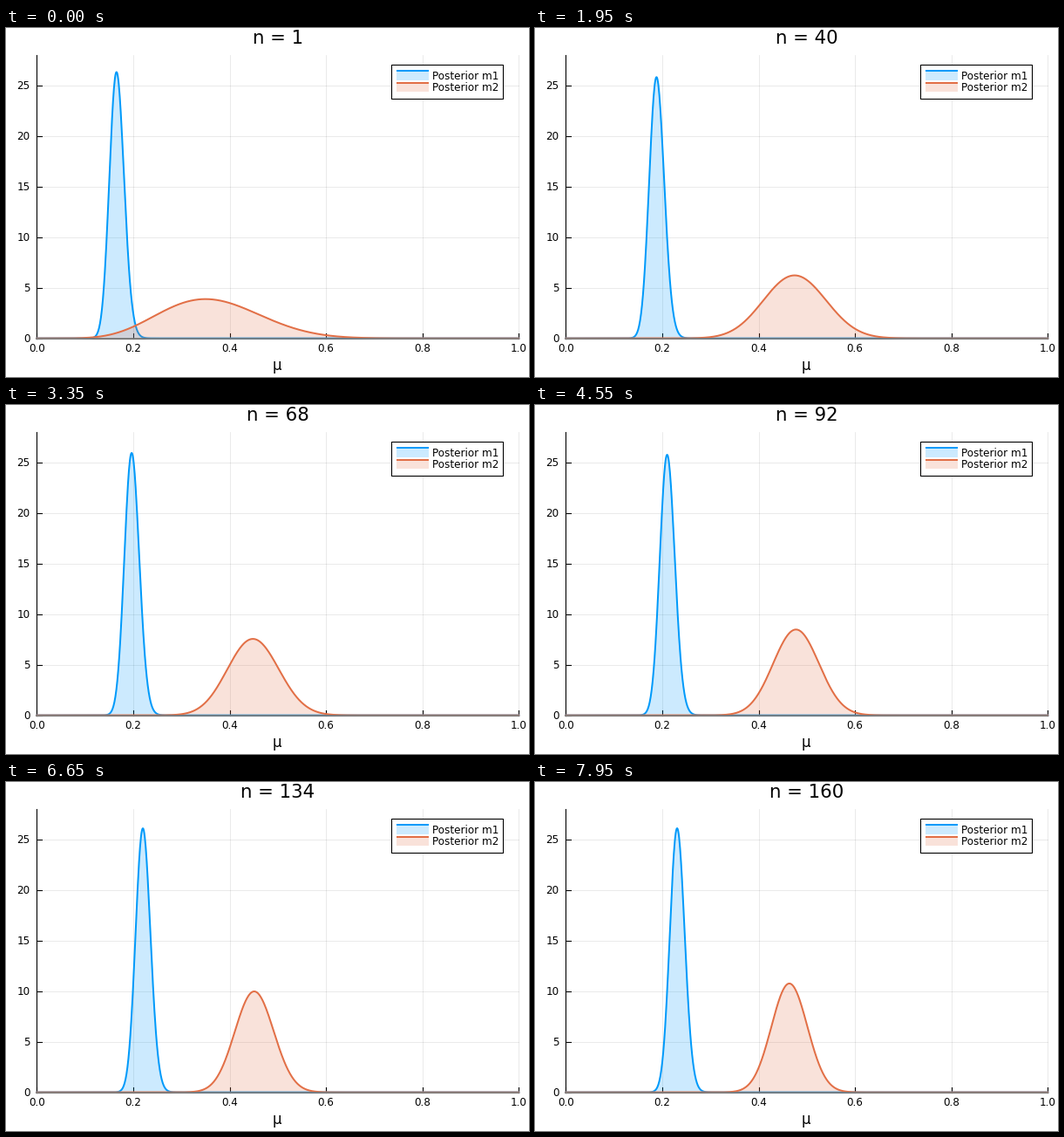
These frames come from a looping animation (600x400 px, 8 s). A matplotlib script:

```python
import math

import numpy as np
import matplotlib.pyplot as plt
from matplotlib.animation import FuncAnimation
from matplotlib.patches import Polygon, Rectangle

plt.rcParams["font.family"] = "DejaVu Sans"

WIDTH, HEIGHT, DPI = 600, 400, 100
FRAMES, INTERVAL = 160, 50

# Plot area in pixels, y pointing down
LEFT, RIGHT = 35.4, 588.3
BASE, UNIT = 355.6, 11.6
TOP = BASE - 28 * UNIT

BLUE, ORANGE = "#009afa", "#e26f46"
PRIORS = [(100, 500, BLUE), (8, 13, ORANGE)]

# Number of successes after n trials, spread evenly between these points
TRIALS = [1, 9, 18, 35, 40, 52, 68, 69, 86, 92, 103, 113, 120, 134, 137, 154, 160]
HITS = [0, 8, 10, 18, 21, 24, 32, 32, 43, 46, 51, 54, 58, 62, 63, 74, 76]

mu = np.linspace(1e-9, 1 - 1e-9, 1001)


def pt(px):
    return px * 72 / DPI


def px_x(v):
    return LEFT + v * (RIGHT - LEFT)


def px_y(v):
    return BASE - v * UNIT


def beta_pdf(a, b):
    norm = math.lgamma(a + b) - math.lgamma(a) - math.lgamma(b)
    return np.exp(norm + (a - 1) * np.log(mu) + (b - 1) * np.log1p(-mu))


def line(x, y, color="black", width=1.1, **kw):
    return ax.plot(x, y, color=color, lw=pt(width), **kw)[0]


def label(x, y, text, size, ha="center", **kw):
    return ax.text(x, y, text, fontsize=pt(size), ha=ha, va="baseline", **kw)


fig = plt.figure(figsize=(WIDTH / DPI, HEIGHT / DPI), dpi=DPI, facecolor="white")
ax = fig.add_axes([0, 0, 1, 1])
ax.set_xlim(0, WIDTH)
ax.set_ylim(HEIGHT, 0)
ax.axis("off")

# Grid, ticks and tick labels
for i in range(6):
    x, y = px_x(i / 5), px_y(5 * i)
    line([x, x], [TOP, BASE], width=0.8, alpha=0.1, zorder=1)
    line([LEFT, RIGHT], [y, y], width=0.8, alpha=0.1, zorder=1)
    line([x, x], [BASE, BASE - 5.5], zorder=2)
    line([LEFT, LEFT + 5.5], [y, y], zorder=2)
    label(x, 371.4, f"{i / 5:.1f}", 12)
    label(27.6, y + 4.5, str(5 * i), 12, ha="right")

line([LEFT, LEFT], [TOP, BASE], zorder=2)
line([LEFT, RIGHT], [BASE, BASE], zorder=2)
line([LEFT, RIGHT], [BASE, BASE], color="#7f7f7f", width=1.7, zorder=6)

title = label((LEFT + RIGHT) / 2, 18.3, "", 21.3)
label((LEFT + RIGHT) / 2 - 0.5, 391.5, "μ", 16.6)

# Posterior curves
curves = []
for i, (a, b, color) in enumerate(PRIORS):
    area = Polygon([(0, 0), (1, 1)], closed=True, fc=color, ec="none",
                   alpha=0.2, zorder=3 + i)
    ax.add_patch(area)
    curves.append((a, b, area, line([], [], color, 2, zorder=3.5 + i)))

# Legend
ax.add_patch(Rectangle((441.5, 41.5), 128.5, 39, fc="white", ec="black",
                       lw=pt(1.1), zorder=8))
for i, (_, _, color) in enumerate(PRIORS):
    y = 49.4 + 13.1 * i
    ax.add_patch(Rectangle((447.5, y), 37, 10.4, fc=color, ec="none",
                           alpha=0.2, zorder=9))
    line([447.5, 484.5], [y, y], color, 2, zorder=10, solid_capstyle="butt")
    label(489, y + 9.9, f"Posterior m{i + 1}", 12, ha="left", zorder=10)


def update(frame):
    n = frame + 1
    k = math.floor(np.interp(n, TRIALS, HITS) + 0.5)
    title.set_text(f"n = {n}")
    xs = px_x(mu)
    for a, b, area, curve in curves:
        ys = px_y(beta_pdf(a + k, b + n - k))
        curve.set_data(xs, ys)
        outline = np.column_stack([xs, ys])
        area.set_xy(np.vstack([[LEFT, BASE], outline, [RIGHT, BASE]]))
    return []


anim = FuncAnimation(fig, update, frames=FRAMES, interval=INTERVAL,
                     repeat=True, repeat_delay=0, blit=False)
plt.show()
```
